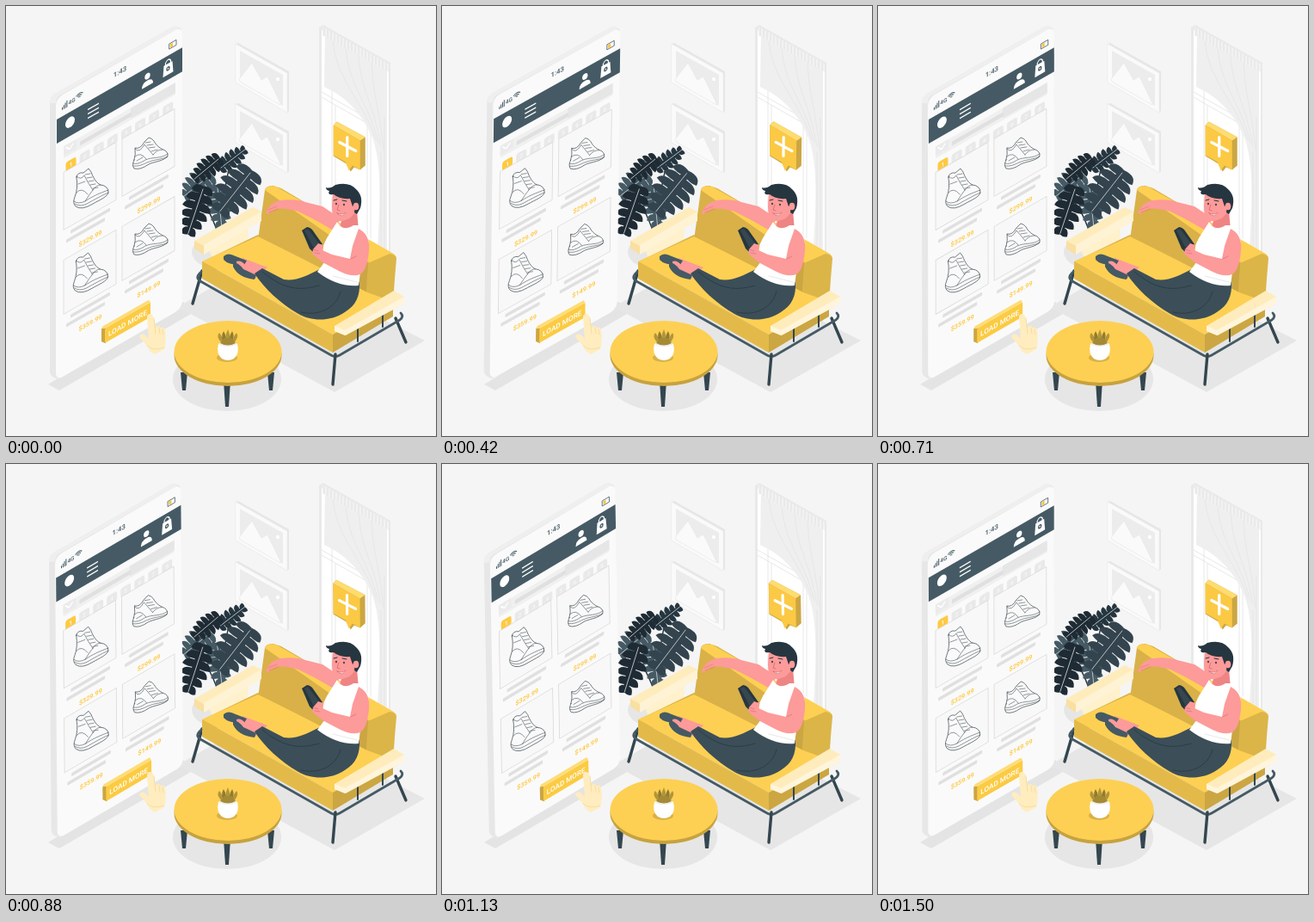
Recreate the animation shown at these times as an HTML page with a canvas. Size 500 px wide and 500 px high, loop 1.54 s.

```html
<!DOCTYPE html>
<html lang="en">
<head>
<meta charset="utf-8">
<title>Shopping from the sofa</title>
<style>
html, body { margin: 0; width: 100%; height: 100%; overflow: hidden; background: #f5f5f5; }
canvas { display: block; width: 500px; height: 500px; }
</style>
</head>
<body>
<canvas id="stage"></canvas>
<script>
const canvas = document.getElementById('stage');
const ctx = canvas.getContext('2d');
const ratio = window.devicePixelRatio || 1;
canvas.width = canvas.height = 500 * ratio;

const LOOP = 1540, STEPS = 37;
const YELLOW = '#fdd053', GOLD = '#d9b148', DARK_GOLD = '#cba643', CREAM = '#ffecbd';
const SLATE = '#455a64', NAVY = '#263640', SKIN = '#fd9a9a', LINE = '#e2e2e2';

function shape(d, fill, stroke, width = 1) {
  const path = new Path2D(d);
  if (fill) { ctx.fillStyle = fill; ctx.fill(path); }
  if (stroke) { ctx.strokeStyle = stroke; ctx.lineWidth = width; ctx.stroke(path); }
}
function oval(x, y, rx, ry, fill) {
  ctx.beginPath();
  ctx.ellipse(x, y, rx, ry, 0, 0, 7);
  ctx.fillStyle = fill;
  ctx.fill();
}
function bar(x, y, w, h, r, fill) {
  ctx.beginPath();
  ctx.roundRect(x, y, w, h, r);
  ctx.fillStyle = fill;
  ctx.fill();
}
function label(text, x, y, size, fill, weight = 500) {
  ctx.font = `${weight} ${size}px Roboto, sans-serif`;
  ctx.textAlign = 'center';
  ctx.textBaseline = 'middle';
  ctx.fillStyle = fill;
  ctx.fillText(text, x, y);
}
function group(draw) {
  ctx.save();
  draw();
  ctx.restore();
}
function shifted(dx, dy, draw) {
  group(() => {
    ctx.translate(dx, dy);
    draw();
  });
}
function swing(degrees, x, y, draw) {
  group(() => {
    ctx.translate(x, y);
    ctx.rotate(degrees * Math.PI / 180);
    ctx.translate(-x, -y);
    draw();
  });
}

// Triangle wave: 0, 1, 0, -1 over one loop, slightly ahead in phase.
function sway(t) {
  const p = (t + 45) / LOOP;
  return 1 - 4 * Math.abs((p + 0.25) % 1 - 0.5);
}

function picture() {
  shape('M267 44l3-1 59 33v46l-2 2-60-35z', '#e6e6e6');
  shape('M267 44l60 34v46l-60-35z', '#fafafa', '#ebebeb', .7);
  shape('M272 52l50 28v36l-50-28z', '#ececec');
  shape('M272 84l14-18 11 20 7-4 15 31v2l-47-27z', '#fafafa', '#e6e6e6', .6);
  oval(316, 85, 2, 2.3, '#fff');
}

function windowAndCurtain() {
  shape('M364 25l5-3 78 44v224l-83-45z', '#e9e9e9');
  shape('M367 28l78 45v215l-78-42z', '#fff');
  shape('M379 42v210M367 100l70 40M367 106l70 40M383 116v130M420 140v128M424 140v130', null, LINE, .8);
  shape('M371 28L443 68V286L432 280C436 220 436 180 426 153C414 124 394 105 370 94Z', '#efefef');
  for (let i = 0; i < 4; i++) {
    const x = 380 + i * 15, y = 38 + i * 8.4;
    shape(`M${x} ${y}C${x + 2} ${y + 45} ${415 + i * 6} 110 ${430 + i * 3} ${155 + i * 4}`, null, '#e6e6e6', .9);
  }
  shape('M436 170V278M440 130V282', null, '#e5e5e5', .9);
  shape('M368 24l77 43v10l-77-43z', '#f2f2f2');
  for (let i = 0; i < 19; i++) {
    const x = 370 + i * 4, y = 25.500 + i * 2.24;
    shape(`M${x} ${y}v9`, null, '#dedede', .8);
  }
}

function room() {
  ctx.fillStyle = '#f5f5f5';
  ctx.fillRect(0, 0, 500, 500);
  picture();
  shifted(0, 70, picture);
  windowAndCurtain();
  shape('M49 440L62 447 222 354 205 344Z', '#e4e4e4');
  shape('M200 350L236 329 300 294 487 389 382 449Z', '#e6e6e6');
  oval(252, 286, 36, 21, '#e6e6e6');
  oval(257, 434, 63, 37, '#e6e6e6');
}

function leaf(x, y, tipX, tipY, width, fill) {
  const len = Math.hypot(tipX - x, tipY - y);
  group(() => {
    ctx.translate(x, y);
    ctx.rotate(Math.atan2(tipY - y, tipX - x));
    oval(len * .45, 0, len * .5, width * .28, fill);
    for (const side of [-1, 1]) {
      for (let i = 0; i < 6; i++) {
        const s = i * .18 - .1, h = side * width * Math.sin(Math.PI * (.33 + .62 * s));
        ctx.beginPath();
        ctx.moveTo((s + .04) * len, 0);
        ctx.quadraticCurveTo((s - .02) * len, h * .9, (s + .17) * len, h);
        ctx.quadraticCurveTo((s + .22) * len, h * .6, (s + .17) * len, 0);
        ctx.fill();
      }
    }
    shape(`M0 0H${len * .95}`, null, '#e3e7e8', .7);
  });
}

function plant() {
  shape('M248 268C247 235 246 210 233 190M250 266C252 230 255 195 263 180M251 265C255 240 258 225 283 193M247 266C240 245 232 228 222 224', null, NAVY, 1.5);
  leaf(246, 211, 251, 258, 15, SLATE);
  leaf(250, 188, 279, 166, 11, NAVY);
  leaf(237, 197, 206, 222, 17, SLATE);
  leaf(284, 194, 247, 241, 24, '#33444e');
  leaf(247, 178, 218, 202, 13, '#1f2b34');
  leaf(229, 213, 211, 267, 17, '#1f2b34');
}

function leg(d, width = 3.4) {
  shape(d, null, '#34464f', width);
}

function sofa() {
  shape('M233 274L282 247 281 283 259 295 239 291Z', '#fff1cc');
  shape('M229 297L293 266 311 275 239 310Z', GOLD);
  leg('M228 308L217 346M453 363L465 391');
  shape('M293 272L301 214Q302 209 311 209L320 212 452 290 451 337 422 354Z', GOLD);
  shape('M301 214Q303 208 314 210L449 287Q454 290 454 294L423 299Z', YELLOW);
  shape('M421 299L446 288Q454 289 454 294L450 340 412 358Z', '#dcb549');
  shape('M411 293L421 299 418 345 407 358Z', DARK_GOLD);
  shape('M228 297L293 268Q350 296 420 333L448 343 380 382Z', YELLOW);
  shape('M228 297L380 382V403L228 317Z', '#e3ba4a');
  shape('M380 382L450 342V361L380 403Z', DARK_GOLD);
  shape('M227 309Q219 316 226 320L378 406Q383 409 388 406L458 365Q463 361 459 357', null, SLATE, 2.8);
  leg('M383 405L380 440');
  shape('M219 273L287 234 297 239V249L231 287 219 281Z', CREAM);
  shape('M219 273L230 279V289L219 282Z', '#f9dfa2');
  shape('M230 278L297 239V250L230 289Z', '#fff3d5');
}

function person() {
  // feet and legs
  shape('M275 293L304 304 296 312 275 301Z', SKIN);
  shape('M253 291Q258 286 267 291L280 296 277 301Q259 302 253 295Z', SLATE);
  shape('M268 297Q273 295 279 302L297 308 290 317Q276 314 268 302Z', SKIN);
  shape('M264 298Q270 298 276 306L291 313 289 318Q270 316 264 303Z', SLATE);
  shape('M365 306C349 314 338 320 323 318L298 305 289 311C300 328 319 346 340 358C355 367 378 367 394 356C407 348 412 337 411 321Z', '#3c4e58');
  shape('M298 309C322 329 340 332 364 325M343 356C365 361 384 351 389 332', null, '#2b3d47', 1);
  // arm along the backrest
  shape('M302 240Q308 228 319 226Q336 224 348 228L368 233 389 247 381 261 358 248 340 239Q324 234 313 236L304 242Z', SKIN);
  shape('M305 237L315 233M306 240L317 236', null, '#e77d79', .7);
  // torso
  shape('M392 242L408 238 410 260 398 266 388 257Z', '#ee8584');
  shape('M385 251Q391 263 404 255L410 255Q424 264 421 278L413 302 410 325Q385 327 362 309L371 297Q365 283 373 270Z', '#fff');
  shape('M373 293Q386 300 404 294M380 314L408 321', null, '#e2e2e2', .8);
  // face and hair
  shape('M380 219Q378 234 380 243Q382 252 391 250Q403 248 408 236L408 218 391 214Z', SKIN);
  shape('M372 211Q377 213 383 208Q399 204 407 213Q416 221 412 235L408 242 405 240 406 231 403 233 400 224Q388 225 381 219Q373 220 376 215Q372 214 372 211Z', NAVY);
  oval(407, 233, 3.3, 4.3, SKIN);
  oval(384, 230, .9, 1.3, NAVY);
  oval(393, 231, .9, 1.3, NAVY);
  shape('M381 226l4-1M391 226l5 1', null, NAVY, 1);
  shape('M387 231l-2 6 3 1', null, '#d4696c', .8);
  shape('M385 241Q390 244 395 240Q391 247 385 241Z', '#fff', '#b95358', .5);
  // phone and arm
  shape('M344 261L350 257Q353 257 356 260L368 277 358 287 353 282Z', '#263640');
  shape('M347 261L351 259 364 276 358 282Z', '#37474f');
  shape('M410 259Q424 266 422 285Q420 307 412 312Q402 316 387 308L368 298 356 288 357 283 363 276 369 278 368 284 379 289 400 294 403 279Z', SKIN);
  shape('M357 283l6 2M359 287l6 1M401 294l6-3', null, '#df7775', .8);
}

function rightArm() {
  leg('M409 375V390M438 358V373', 2);
  shape('M382 372L451 331 463 338V346L395 383 382 378Z', CREAM);
  shape('M382 372L394 377 463 338V346L394 383 382 378Z', '#fff5dc');
}

function bubble() {
  shape('M380 138L384 134 417 152V185L411 190 404 187 400 192 395 183 380 174Z', DARK_GOLD);
  shape('M380 138L384 134 417 152 411 156Z', '#ffdc70');
  shape('M380 138L411 156V190L402 185 398 191 394 181 380 173Z', '#fbc944');
  shape('M396 152V174M387 158L406 168', null, '#fff', 3.2);
}

function shoe(outline, details) {
  shape(outline, '#fafafa', '#38444a', .7);
  shape(details, null, '#38444a', .55);
}
function highTop() {
  shoe('M82 199Q83 193 90 194L96 189 99 193C101 199 105 206 110 208Q119 209 119 217C118 222 108 226 101 230Q88 238 81 233Q77 229 80 222Q84 212 82 199Z',
    'M79 227Q84 231 92 227C101 221 108 218 119 214M80 230Q86 234 94 230C103 225 110 221 119 217M82 198Q87 203 91 197Q96 207 101 214M84 207L92 204M82 217Q88 210 95 219M101 214Q105 208 110 208M92 196l6-1M94 200l6-1M96 204l6-1M98 208l6-1M101 212l6-1M101 214Q97 219 92 227');
}
function lowShoe() {
  shoe('M149 179Q151 173 150 165Q156 167 161 158L166 153Q170 154 172 157C175 163 180 166 185 168Q190 172 187 176C180 181 172 181 166 184Q156 191 149 189Q146 185 149 179Z',
    'M148 183Q153 185 162 179C171 175 180 178 188 172M148 186Q155 187 164 182C172 178 182 179 188 175M150 166Q155 172 161 161L171 173M150 175Q157 169 163 178M171 173Q175 167 182 167M162 159l6-1M164 162l7-1M166 165l7-1M169 169l7-2M152 180l7-4');
}

function product(u, v, height, price) {
  bar(u, v, 61, height, 0, '#f8f8f8');
  ctx.strokeStyle = '#d9d9d9';
  ctx.lineWidth = .8;
  ctx.strokeRect(u, v, 61, height);
  const mid = u + 31, base = v + height;
  bar(mid - 23, base + 5, 46, 4, 1, '#e0e0e0');
  bar(mid - 28, base + 13, 45, 4, 1, '#e0e0e0');
  label(price, mid, base + 28, 7.3, '#ffc535');
}

function statusBar() {
  for (let i = 0; i < 4; i++) bar(6 + i * 1.8, -10.500 - i * 1.6, 1, 3 + i * 1.6, 0, SLATE);
  label('4G', 17.5, -11, 6.5, SLATE);
  for (let r = 1; r < 6; r += 2) {
    ctx.beginPath();
    ctx.arc(26.5, -10.5, r, -2.4, -.75);
    ctx.strokeStyle = SLATE;
    ctx.lineWidth = 1;
    ctx.stroke();
  }
  label('1:43', 73.5, -13, 7.8, SLATE);
  ctx.strokeStyle = SLATE;
  ctx.lineWidth = .7;
  ctx.strokeRect(131, -13, 8, 6);
  bar(132, -12, 3, 4, 0, '#ffc535');
}

function header() {
  bar(0, 0, 146, 28, 0, SLATE);
  oval(15.5, 12, 5.5, 6, '#fff');
  for (let i = 0; i < 3; i++) bar(36, 8.5 + i * 5, 13, 1.5, .5, '#fff');
  oval(105.5, 10, 3.2, 3.6, '#fff');
  shape('M99 21.500Q99 15 105.500 15Q112 15 112 21.500Z', '#fff');
  shape('M124.500 9H134.500L135.500 22H123.500Z', '#fff');
  shape('M126.500 10V7Q129.500 2 132.500 7V10', null, '#fff', 1.2);
  oval(129.5, 15, 2.2, 2.5, SLATE);
  oval(129.5, 15, .8, 1, '#fff');
}

function phone() {
  shape('M51 113Q51 106 57 102L194 24Q200 22 204 27L205 50 204 352 60 434Q51 431 51 425Z', '#e7e7e7');
  shape('M51 113Q51 106 57 102L194 24Q199 23 202 25L62 104Q58 107 58 113Z', '#efefef');
  group(() => {
    ctx.transform(1, -.573, 0, 1, 59, 132);
    bar(-1, -25, 147, 328, 8, '#fafafa');
    statusBar();
    header();
    bar(8, 36, 130, 14, 1, '#f0f0f0');
    bar(86, 36, 52, 12, 1, '#e6e6e6');
    bar(27, 41, 60, 5, 1, '#e0e0e0');
    bar(8, 36, 15, 11, 1, '#ebebeb');
    shape('M11 39l4 4 4-4', null, '#fff', 1.5);
    for (let i = 0; i < 8; i++) {
      bar(10.5 + i * 16.1, 56, 12, 11, 2.5, i ? '#e9e9e9' : '#ffc943');
      label(i + 1, 16.5 + i * 16.1, 62, 6.5, i ? '#f8f8f8' : '#fff');
    }
    product(8, 66, 67, '$329.99');
    product(76, 66, 67, '$299.99');
    product(8, 168, 63, '$359.99');
    product(76, 168, 63, '$149.99');
    shape('M52 273L57 275V293L52 288Z', DARK_GOLD);
    bar(56, 275, 53, 17, 1.5, '#fbcb43');
    shape('M52 273Q53 270 56 271L107 271 109 275H57Z', '#ffdc75');
    label('LOAD MORE', 82.5, 284.5, 8.2, '#fff');
  });
  highTop();
  shifted(-.5, 98, highTop);
  lowShoe();
  shifted(0, 100, lowShoe);
}

function hand() {
  shape('M164 362Q164 358 168 358Q171 359 172 363L174 374Q177 370 180 374Q183 372 185 377Q187 387 184 399L173 405Q166 401 164 395L155 385Q156 380 161 382L166 387Z', '#ffedc0');
  shape('M172 363L174 381M178 374L179 381M182 376L183 382M164 395Q171 402 184 397', null, '#f6d993', .8);
}

function table() {
  for (const [x, y, h] of [[207, 426, 21], [257, 436, 30], [308, 426, 21]]) {
    shape(`M${x - 4} ${y}h8l-2 ${h}h-4z`, '#34464f');
  }
  oval(258, 406, 62.5, 36, '#c7a23f');
  oval(258, 402, 62.5, 36, YELLOW);
  oval(257, 409, 12, 5, '#d9b148');
  for (let i = -2; i <= 2; i++) {
    const tip = 258 + i * 5, top = 376 + Math.abs(i) * 2;
    shape(`M${258 + i * 2} 394Q${tip - 5} 386 ${tip} ${top}Q${tip + 4} 385 ${259 + i * 2} 394Z`, i % 2 ? '#8f7b32' : '#b3953a');
  }
  shape('M247 393Q258 387 269 393Q272 404 265 410Q258 414 251 410Q244 404 247 393Z', '#fff');
  oval(258, 393, 10, 3, '#eeeeee');
  shape('M249 392Q258 397 267 392L262 386H254Z', '#a58a36');
}

function draw(t) {
  const angle = sway(t) - sway(0);
  ctx.setTransform(ratio, 0, 0, ratio, 0, 0);
  ctx.lineCap = ctx.lineJoin = 'round';
  room();
  swing(angle, 235, 240, plant);
  sofa();
  person();
  rightArm();
  swing(angle, 399, 190, () => shifted(.8, .5, bubble));
  swing(angle, 128, 229, phone);
  hand();
  table();
}

const start = performance.now();
function tick() {
  const step = Math.floor((performance.now() - start) % LOOP / LOOP * STEPS);
  draw(step * LOOP / STEPS);
  requestAnimationFrame(tick);
}
tick();
</script>
</body>
</html>
```
